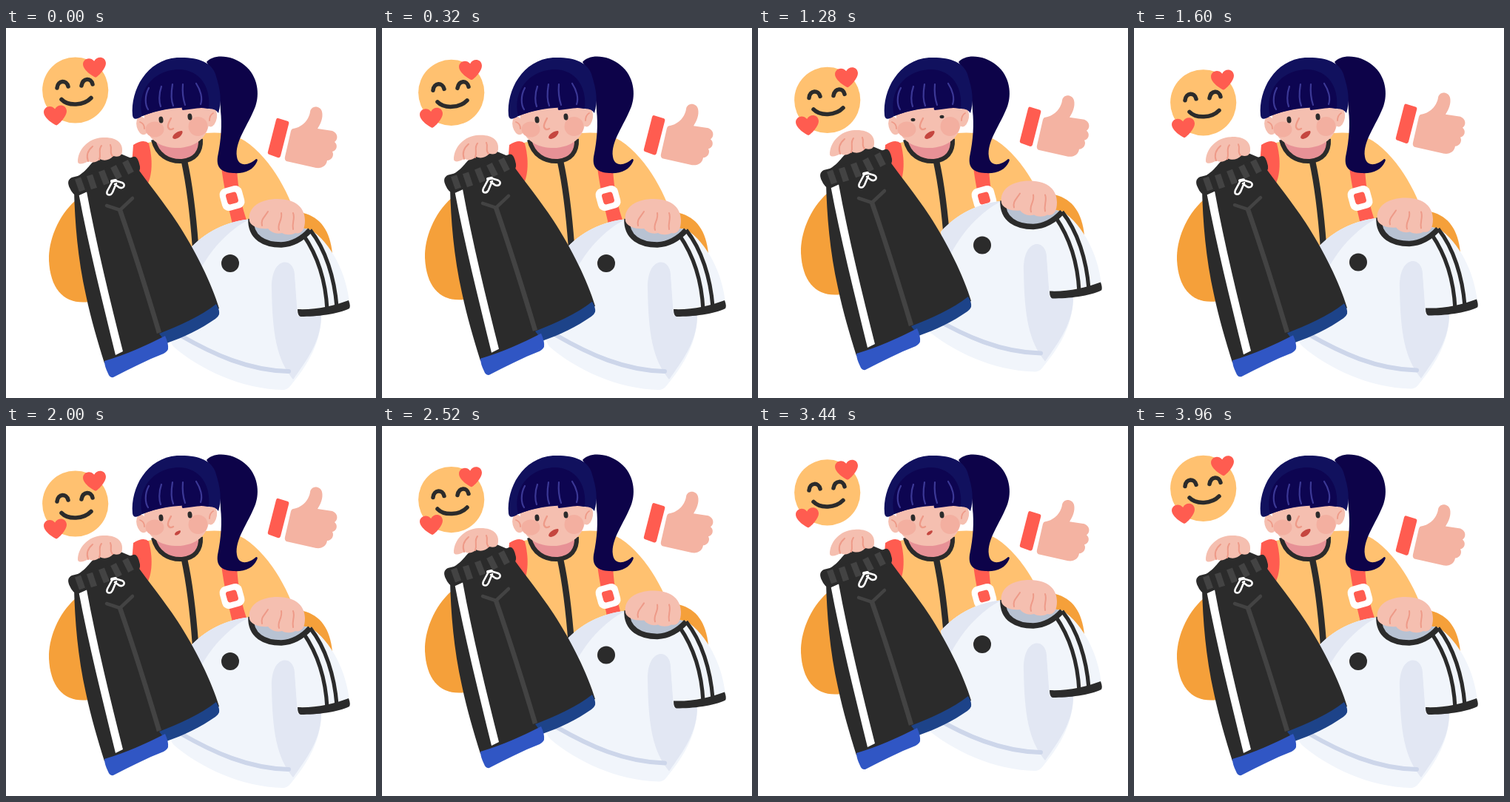
An HTML page with a canvas that plays this animation: 500x500 px, repeating every 4 s.

```html
<!DOCTYPE html>
<html lang="en">
<head>
<meta charset="utf-8">
<title>Choosing sportswear</title>
<style>
html, body { margin: 0; width: 100%; height: 100%; overflow: hidden; background: #fff; }
canvas { display: block; width: 500px; height: 500px; }
</style>
</head>
<body>
<canvas id="stage"></canvas>
<script>
const LOOP = 4000, HALF = 2000, STEP = 40;
const C = {
  ink: '#2b2b2b', grey: '#434343', sun: '#ffc170', sleeve: '#f5a03a', red: '#ff5c50',
  skin: '#f5bfb0', thumb: '#f4b3a2', crease: '#ee9a88', blush: '#f3afa0', neck: '#e79196',
  hair: '#11115e', fringe: '#0d0551', tail: '#0d0349', strand: '#3b3896',
  tee: '#f1f5fb', shade: '#e2e7f3', hem: '#cdd6ea', inside: '#b8c2d2',
  blue: '#3056c4', navy: '#1d4389'
};

const canvas = document.getElementById('stage');
const ctx = canvas.getContext('2d');
const ratio = window.devicePixelRatio || 1;
canvas.width = canvas.height = 500 * ratio;

const paths = {};
const path = d => paths[d] || (paths[d] = new Path2D(d));

function fill(color, d) {
  ctx.fillStyle = color;
  ctx.fill(path(d));
}

function line(color, width, d, cap = 'round') {
  ctx.strokeStyle = color;
  ctx.lineWidth = width;
  ctx.lineCap = cap;
  ctx.lineJoin = 'round';
  ctx.stroke(path(d));
}

function oval(color, x, y, rx, ry = rx, turn = 0) {
  ctx.fillStyle = color;
  ctx.beginPath();
  ctx.ellipse(x, y, rx, ry, turn, 0, Math.PI * 2);
  ctx.fill();
}

function box(color, size, radius) {
  ctx.fillStyle = color;
  ctx.beginPath();
  ctx.roundRect(-size / 2, -size / 2, size, size, radius);
  ctx.fill();
}

function at(x, y, turn, draw) {
  ctx.save();
  ctx.translate(x, y);
  ctx.rotate(turn);
  draw();
  ctx.restore();
}

const shifted = (dy, draw) => at(0, dy, 0, draw);

// Cubic ease in and out between two moments
function ease(t, from, to) {
  const u = Math.min(1, Math.max(0, (t - from) / (to - from)));
  return u < 0.5 ? 4 * u ** 3 : 1 - 4 * (1 - u) ** 3;
}

const heart = () => fill(C.red,
  'M0 13.5C-2 13.5-15.5 3-15.5-5C-15.5-13-5-16 0-8.5C5-16 15.5-13 15.5-5C15.5 3 2 13.5 0 13.5Z');

function emoji() {
  oval(C.sun, 93.7, 84, 44.6);
  line(C.ink, 5.5, 'M69 81C70 70 82 70 84 79M102 78C104 67 115 67 117 76');
  line(C.ink, 5.5, 'M75 96.5C84 106 105 105 115 94.5');
  at(120, 53.3, -0.1, heart);
  at(67, 118, -0.1, heart);
}

function thumbsUp() {
  fill(C.red, 'M368 122L381 126Q383 127 382 130L371 173Q370 176 367 175L356 171Q353 170 354 167L365 124Q366 121 368 122Z');
  fill(C.thumb, 'M388 136C402 134 410 122 411 113C413 104 425 105 427 113C429 121 425 130 421 136L441 139C449 142 449 151 444 154C449 158 447 166 441 167C444 172 440 179 434 179C433 186 427 190 419 189L379 180Q376 178 377 174L385 139Q386 136 388 136Z');
}

function torso() {
  fill(C.sun, 'M180 158C215 149 262 139 294 142C334 146 368 195 385 236L390 265L340 305L250 320L180 205Z');
  fill(C.red, 'M172 158Q186 149 193 156C198 175 199 200 189 215L170 185Z');
  fill(C.red, 'M291 188L312 188C313 218 319 243 327 265L306 265C299 236 294 212 291 188Z');
  at(305.5, 230, -0.27, () => {
    box('#fff', 31, 9);
    box(C.red, 15, 3.5);
  });
  fill(C.neck, 'M200 148C205 174 222 181 238 180C257 178 264 166 262 148Z');
  line(C.ink, 8.5, 'M241 180C248 212 253 255 256 295', 'butt');
  line(C.ink, 6, 'M199 151C204 172 220 181 238 180C255 178 264 168 263 150', 'butt');
}

function head(eyeOpen, mouth) {
  fill(C.tail, 'M271 46C280 35 305 36 322 50C341 65 343 90 337 106C327 132 309 153 312 174C314 188 328 186 338 177Q341 177 339 181C334 192 323 197 307 196C291 195 284 189 286 174C291 150 292 130 290 112C290 85 280 60 271 46Z');
  oval(C.skin, 184, 132, 7.5, 12.5, -0.25);
  oval(C.skin, 277.5, 120.5, 7.5, 13, 0.15);
  fill(C.skin, 'M184 105L190 138C196 154 212 163 236 162C261 159 275 145 275 120L274 100Z');
  line(C.crease, 1.8, 'M181 127Q187 129 187 136M280 115Q275 118 275 125');
  oval(C.blush, 201, 137, 12.5, 10.5);
  oval(C.blush, 259.5, 133, 13, 13);
  line(C.crease, 2.4, 'M223 122Q218 131 219 134Q221 139 226 136');
  oval(C.ink, 209.5, 124, 3, 4.6 * eyeOpen, -0.1);
  oval(C.ink, 248.5, 120, 3, 4.6 * eyeOpen, -0.1);
  at(232, 144.3, -0.27, () => {
    ctx.scale(mouth, mouth);
    fill('#c5463f', 'M-7.5 1.5C-6-3 3-5 7-3.5C9-.5 2 5-4 4.6Q-8 4-7.5 1.5Z');
  });
  fill(C.hair, 'M171 118C168 84 190 43 231 40C260 39 277 46 283 62C290 84 292 99 287 115Q283 108 272 109C252 105 212 107 184 119Q172 127 171 118Z');
  fill(C.fringe, 'M184 119C176 84 199 58 231 56C262 55 277 80 274 108C262 107 252 110 239 111Q237 110 238 107C215 108 200 113 184 119Z');
  line(C.strand, 2.2, 'M193 81C187 92 188 104 192 110M210 79C206 90 207 101 209 106M225 76C223 88 223 98 226 105M239 76C238 88 240 98 242 104M257 75C263 84 266 95 263 103');
}

function tee() {
  fill(C.sleeve, 'M370 250L402 250C425 256 438 274 441 305L410 305Z');
  fill(C.tee, 'M329 258.5C298 261 268 276 247 300C252 325 250 370 222 420Q223 428 228 432C262 461 318 488 374 489Q380 489 384 484C402 462 426 430 426 388L410 272Z');
  fill(C.shade, 'M329 258.5C298 261 268 276 247 300L258 335C274 302 300 273 329 258.5Z');
  fill(C.shade, 'M359 352C358 308 389 309 390 333L394 389L426 386C427 422 407 448 388 475C366 448 360 415 359 352Z');
  line(C.hem, 6, 'M235 415C280 441 328 463 382 464');
  fill(C.tee, 'M380 285L411 272C440 291 460 332 464 371L394 382L390 330Z');
  line(C.ink, 5.2, 'M402 280C420 306 432 340 434 381M411 273C432 299 444 338 447 377', 'butt');
  fill(C.ink, 'M394 380C418 381 442 376 463 368Q466 376 464 379C448 387 420 390 398 390Q394 389 394 380Z');
  fill(C.inside, 'M331 258C330 284 350 293 372 293C390 292 402 283 409 272Z');
  line(C.ink, 7.5, 'M331 258C330 284 350 293 372 293C390 292 402 283 411 273', 'butt');
  oval(C.ink, 303, 318, 12);
  fill(C.skin, 'M329 261C326 241 345 231 367 231C394 231 404 245 404 260C404 273 399 279 391 277C386 280 378 280 373 277C366 279 359 277 354 271C346 272 332 270 329 261Z');
  line(C.crease, 2, 'M354 248C349 256 344 259 346 267M372 250C374 260 366 264 369 273M388 250C391 258 386 263 388 272');
}

function trousers() {
  fill(C.ink, 'M90 204C108 196 112 185 120 179L155 170L174 178L170 200Z');
  fill(C.ink, 'M92 220C93 262 97 312 108 361C115 394 124 424 133 453L212 424L288 379C278 345 256 301 232 264C212 234 194 212 178 190Z');
  fill(C.navy, 'M207 413C235 402 262 390 284 373Q289 381 288 387Q287 390 283 393C263 407 240 418 217 426Z');
  fill(C.blue, 'M133 450C163 441 190 429 215 416Q220 427 219 434Q218 437 213 440C190 449 168 460 145 472Q140 473 138 467Q133 457 133 450Z');
  fill('#fff', 'M98.5 225L109 221C122 292 141 370 158 437L148 442C130 368 111 292 98.5 225Z');
  line(C.grey, 6.5, 'M154 246C172 298 190 355 207 412', 'butt');
  line(C.grey, 4.5, 'M136 240L154 246L171 230');
  fill(C.ink, 'M89 202C118 195 145 184 172 174Q178 172 181 187Q182 194 176 197C151 204 126 214 99 226Q91 228 86 216Q81 206 89 202Z');
  line(C.grey, 8.5, 'M97 203L103 220M113 199L119 217M129 193L136 211M145 187L153 203M161 180L169 196', 'butt');
  line('#fff', 4, 'M143 207L148 206');
  line('#fff', 2.6, 'M144 207L137 220Q135 225 139 225.5Q142 226 144 222L149 210M147 206L157 209Q161 211 159 214.5Q157 217 153 215.5L147 211');
  fill(C.skin, 'M97 181C97 165 110 149 131 148C150 147 158 156 157 166C157 173 152 175 145 173C140 179 132 180 127 177C121 183 116 182 111 180C105 184 98 185 97 181Z');
  line(C.crease, 2, 'M117 160C110 166 108 172 111 180M129 159C124 165 129 170 126 178M141 158C144 164 139 168 144 173');
}

function mouthSize(t) {
  const u = (t * 3 / LOOP) % 1;
  return 1 - 0.42 * (ease(u, 0.36, 0.54) - ease(u, 0.64, 0.86));
}

function draw(t) {
  const half = t % HALF;
  const drift = 1 - Math.abs(1 - t / HALF);
  const legLift = -10 * (ease(half, 200, 480) - ease(half, 1280, 1720));
  const teeLift = -24.5 * (ease(half, 400, 670) - ease(half, 1360, 1680));
  const blink = Math.max(0, 1 - Math.abs(t - 1320) / 110);

  ctx.setTransform(ratio, 0, 0, ratio, 0, 0);
  ctx.fillStyle = '#fff';
  ctx.fillRect(0, 0, 500, 500);

  shifted(21 * drift, emoji);
  shifted(-24 * drift, thumbsUp);
  shifted(legLift, () => fill(C.sleeve, 'M94 233C70 254 57 288 58 314C60 355 80 374 112 370L140 290Z'));
  torso();
  head(1 - 0.8 * blink, mouthSize(t));
  shifted(teeLift, tee);
  shifted(legLift, trousers);
}

const start = performance.now();
function tick() {
  const t = (performance.now() - start) % LOOP;
  draw(Math.floor(t / STEP) * STEP);
  requestAnimationFrame(tick);
}
tick();
</script>
</body>
</html>
```
